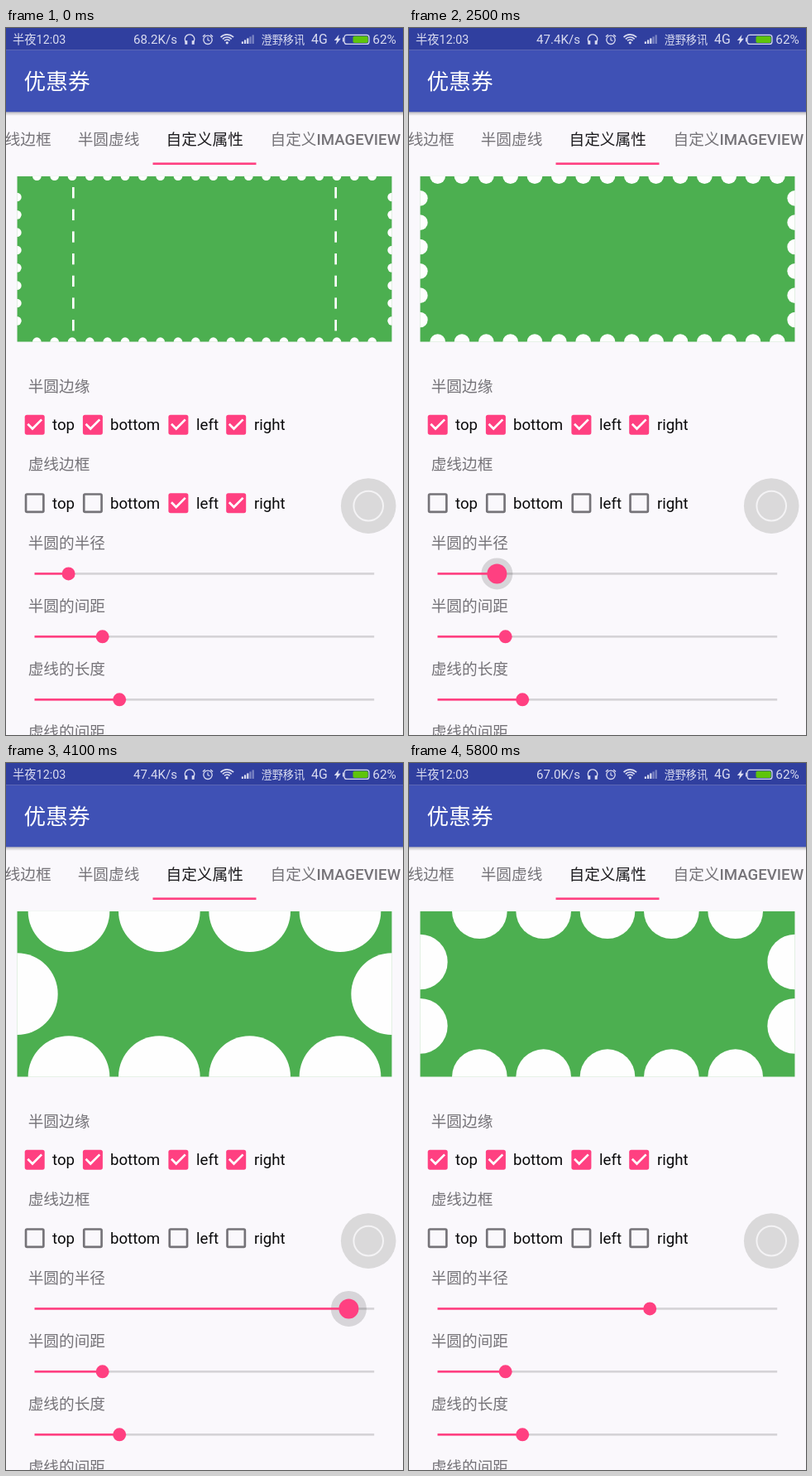
These frames come from a looping animation (480x853 px, 5.9 s). An HTML page with a canvas:

```html
<!DOCTYPE html>
<html lang="zh-CN">
<head>
<meta charset="utf-8">
<style>
html, body { margin: 0; width: 100%; height: 100%; overflow: hidden; background: #faf8fc; }
canvas { display: block; width: 480px; height: 853px; }
</style>
</head>
<body>
<canvas id="stage"></canvas>
<script>
const W = 480, H = 853, LOOP = 5900, STEP = 100;
const DP = 4 / 3;
const PINK = '#ff4081', GREY = '#757378', PAGE = '#faf8fc', ICON = '#dadcf0';
const FONT = 'Roboto, "Noto Sans CJK SC", "Noto Sans CJK", sans-serif';

const canvas = document.getElementById('stage');
const g = canvas.getContext('2d');
const ratio = window.devicePixelRatio || 1;
canvas.width = Math.round(W * ratio);
canvas.height = Math.round(H * ratio);

// Linear interpolation through [time, value] pairs
function track(keys, t) {
  if (t <= keys[0][0]) return keys[0][1];
  for (let i = 1; i < keys.length; i++) {
    const [t0, v0] = keys[i - 1], [t1, v1] = keys[i];
    if (t <= t1) return v0 + (v1 - v0) * (t - t0) / (t1 - t0);
  }
  return keys[keys.length - 1][1];
}

function text(str, x, y, size, color, weight = 400) {
  g.font = `${weight} ${size}px ${FONT}`;
  g.fillStyle = color;
  g.fillText(str, x, y);
}

function rect(x, y, w, h, color) {
  g.fillStyle = color;
  g.fillRect(x, y, w, h);
}

function round(x, y, w, h, r) {
  g.beginPath();
  g.roundRect(x, y, w, h, r);
}

function disc(x, y, r, color) {
  g.beginPath();
  g.arc(x, y, r, 0, Math.PI * 2);
  g.fillStyle = color;
  g.fill();
}

function arc(x, y, r, from, to, width, color) {
  g.beginPath();
  g.arc(x, y, r, from * Math.PI, to * Math.PI);
  g.lineWidth = width;
  g.strokeStyle = color;
  g.stroke();
}

function line(points, width, color) {
  g.beginPath();
  points.forEach(([x, y]) => g.lineTo(x, y));
  g.lineWidth = width;
  g.strokeStyle = color;
  g.stroke();
}

function shape(points, color) {
  g.beginPath();
  points.forEach(([x, y]) => g.lineTo(x, y));
  g.fillStyle = color;
  g.fill();
}

function statusBar(t) {
  rect(0, 0, W, 26.7, '#303f9f');
  text('半夜12:03', 8, 19, 14.3, ICON);
  const speed = t < 1000 ? '68.2' : t < 4900 ? '47.4' : '67.0';
  text(speed + 'K/s', 154, 19, 15.1, ICON);

  // headphones
  arc(222, 13.5, 5.7, 0.8, 2.2, 1.3, ICON);
  rect(216.3, 15.2, 3, 4.6, ICON);
  rect(224.7, 15.2, 3, 4.6, ICON);

  // alarm clock
  arc(244, 14.3, 5.2, 0, 2, 1.3, ICON);
  line([[244, 11.3], [244, 14.6], [246.4, 15.6]], 1.1, ICON);
  line([[237.9, 10.6], [240.8, 8.1]], 1.3, ICON);
  line([[250.1, 10.6], [247.2, 8.1]], 1.3, ICON);

  // wifi
  for (const r of [4.4, 7.4, 10.6]) arc(267.3, 18.4, r, 1.24, 1.76, 1.7, ICON);
  disc(267.3, 17.8, 1.6, ICON);

  // signal
  for (let i = 0; i < 5; i++) {
    const h = 2.6 + i * 2;
    rect(284.8 + i * 3.2, 19 - h, 2.2, h, i < 3 ? ICON : 'rgba(218,220,240,.45)');
  }

  text('澄野移讯', 308.5, 18.8, 13.2, ICON);
  text('4G', 369, 19, 15.8, ICON);
  shape([[402.6, 8], [396.8, 14.9], [400, 14.9], [398.8, 20], [404.8, 12.8], [401.5, 12.8]], ICON);

  // battery
  round(409, 8.4, 30, 11, 3);
  g.lineWidth = 1.2;
  g.strokeStyle = ICON;
  g.stroke();
  rect(407, 11.5, 1.5, 5, ICON);
  round(419.5, 9.8, 18.2, 8.2, 1.8);
  g.fillStyle = '#5ec40c';
  g.fill();
  text('62%', 443.3, 19, 15.4, ICON);
}

function header() {
  const shade = g.createLinearGradient(0, 101, 0, 106);
  shade.addColorStop(0, 'rgba(0,0,0,.26)');
  shade.addColorStop(1, 'rgba(0,0,0,0)');
  rect(0, 101, W, 5, shade);
  rect(0, 26.7, W, 74.6, '#3f51b5');
  text('优惠券', 21.6, 74, 26.67, '#fff');

  const size = 14 * DP, y = 140.7;
  text('虚线边框', -20, y, size, GREY);
  text('半圆虚线', 86.7, y, size, GREY);
  text('自定义属性', 193.5, y, size, '#1c1b1e');
  text('自定义', 319.5, y, size, GREY);
  text('IMAGEVIEW', 375.5, y, size, GREY, 500);
  rect(177.5, 162.4, 125, 2.67, PINK);
}

// Places evenly sized marks along a side, centred, with a gap at both ends
function spread(length, size, gap, put) {
  const pitch = size + gap;
  const count = Math.floor((length - gap) / pitch + 1e-6);
  const rest = length - gap - count * pitch;
  for (let i = 0; i < count; i++) put(rest / 2 + gap + i * pitch);
}

function ticket(radiusDp, dashLeft, dashRight) {
  const x = 10 * DP, y = 178.7, w = 340 * DP, h = 150 * DP;
  const r = radiusDp * DP, gap = 8 * DP;
  g.save();
  g.beginPath();
  g.rect(x, y, w, h);
  g.clip();
  rect(x, y, w, h, '#4caf50');
  spread(w, r * 2, gap, p => {
    disc(x + p + r, y, r, '#fefefe');
    disc(x + p + r, y + h, r, '#fefefe');
  });
  spread(h, r * 2, gap, p => {
    disc(x, y + p + r, r, '#fefefe');
    disc(x + w, y + p + r, r, '#fefefe');
  });
  const dash = 10 * DP, thick = 2 * DP, inset = 50 * DP;
  spread(h, dash, dash, p => {
    if (dashLeft) rect(x + inset, y + p, thick, dash, '#fefefe');
    if (dashRight) rect(x + w - inset - thick, y + p, thick, dash, '#fefefe');
  });
  g.restore();
}

function checkbox(x, y, on) {
  const half = 9 * DP;
  if (on) {
    round(x - half, y - half, half * 2, half * 2, 2.6);
    g.fillStyle = PINK;
    g.fill();
    line([[x - 8.4, y - 0.9], [x - 2.7, y + 4.8], [x + 8.4, y - 6.3]], 2.67, '#fff');
  } else {
    const e = half - DP;
    round(x - e, y - e, e * 2, e * 2, 1.4);
    g.lineWidth = 2 * DP;
    g.strokeStyle = GREY;
    g.stroke();
  }
}

const BOXES = [['top', 34.7, 56], ['bottom', 104.9, 126], ['left', 208.4, 230], ['right', 278.2, 300]];

function checkRow(y, states) {
  BOXES.forEach(([name, x, tx], i) => {
    checkbox(x, y, states[i]);
    text(name, tx, y + 6.6, 14 * DP, '#0a0a0b');
  });
}

function ripple(x, y, age) {
  if (age < 0 || age >= 500) return;
  const r = track([[0, 12], [200, 22]], age);
  const alpha = track([[0, .05], [200, .13], [500, 0]], age);
  disc(x, y, r, `rgba(0,0,0,${alpha})`);
}

function slider(y, part, thumb = 8, halo = 0, alpha = 0) {
  const x0 = 34.5, len = 410.7, x = x0 + len * part;
  if (alpha > 0) disc(x, y, halo, `rgba(0,0,0,${alpha})`);
  rect(x, y - 1.33, x0 + len - x, 2.67, 'rgba(0,0,0,.15)');
  rect(x0, y - 1.33, x - x0, 2.67, PINK);
  disc(x, y, thumb, PINK);
}

const RADIUS = [[2000, 5], [2500, 7], [2700, 7], [2900, 8], [3000, 8], [3100, 9], [3500, 15],
  [3700, 20], [4100, 37], [4200, 37], [4600, 32], [5300, 25]];
const THUMB = [[2000, 8], [2300, 12], [5300, 12], [5700, 8]];
const HALO = [[2000, 8], [2500, 19], [2600, 21], [2800, 21.5]];
const GLOW = [[2000, 0], [2300, .14], [5100, .14], [5400, 0]];
const TAP_LEFT = 400, TAP_RIGHT = 1000, HOLD = 200;

function draw(t) {
  g.setTransform(ratio, 0, 0, ratio, 0, 0);
  rect(0, 0, W, H, PAGE);
  header();
  statusBar(t);

  const radius = t < 2000 ? 4 : Math.round(track(RADIUS, t));
  const left = t < TAP_LEFT + HOLD, right = t < TAP_RIGHT + HOLD;
  ticket(radius, left, right);

  ['半圆边缘', '虚线边框', '半圆的半径', '半圆的间距', '虚线的长度', '虚线的间距'].forEach((label, i) => {
    const y = i < 2 ? 438.8 + i * 94.6 : 628 + (i - 2) * 76;
    text(label, 26.7, y, 14 * DP, GREY);
  });

  checkRow(478.7, [true, true, true, true]);
  ripple(BOXES[2][1], 573.2, t - TAP_LEFT);
  ripple(BOXES[3][1], 573.2, t - TAP_RIGHT);
  checkRow(573.2, [false, false, left, right]);

  slider(658.4, radius / 40, track(THUMB, t), track(HALO, t), track(GLOW, t));
  slider(734.3, .2);
  slider(810.3, .25);

  // floating assist button
  disc(438.2, 576.6, 33.3, '#dad9da');
  arc(438.2, 576.6, 17.8, 0, 2, 2, '#f4f3f5');
}

const start = performance.now();
function tick() {
  const t = (performance.now() - start) % LOOP;
  draw(Math.floor(t / STEP) * STEP);
  requestAnimationFrame(tick);
}
tick();
</script>
</body>
</html>
```
